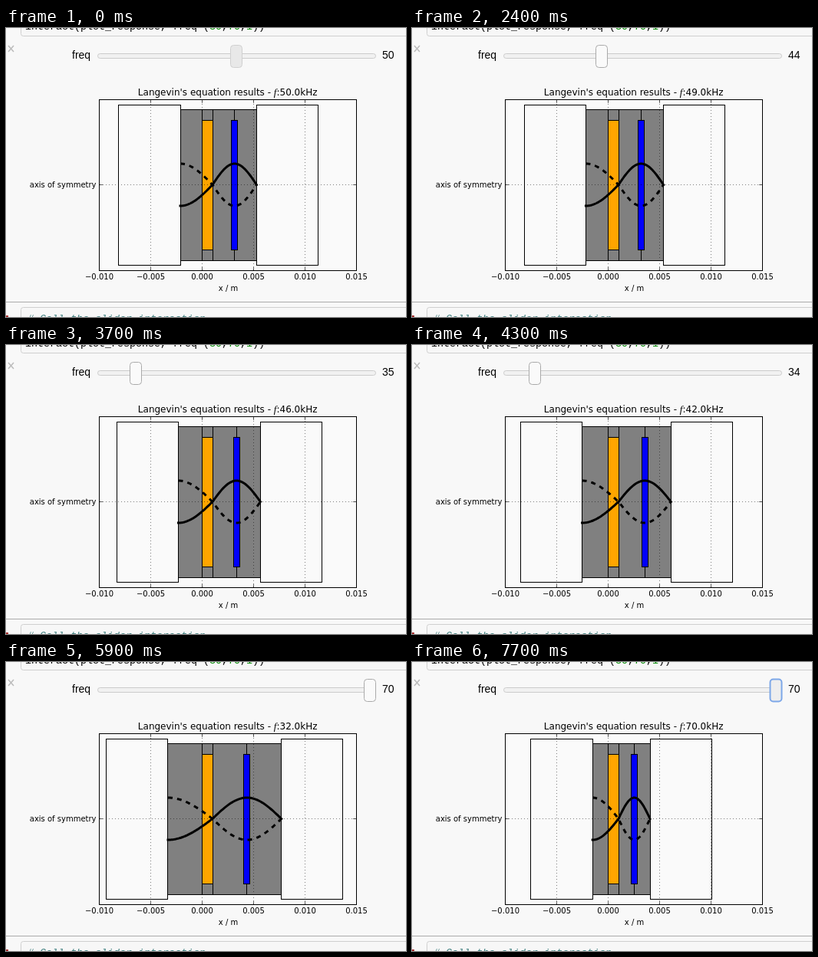
These frames come from a looping animation (521x377 px, 9.2 s). An HTML page:

```html
<!DOCTYPE html>
<html>
<head>
<meta charset="utf-8">
<style>
html, body { margin: 0; height: 100%; overflow: hidden; background: #f8f8f8; }
svg { display: block; }
text { font: 10px "DejaVu Sans", sans-serif; white-space: pre; }
.ui { font: 14px "Liberation Sans", sans-serif; }
.code { font: 13.33px "Liberation Mono", monospace; }
.mid { text-anchor: middle; }
.cell { fill: #f7f7f7; stroke: #cfcfcf; }
.edge { stroke: #000; }
.wave { fill: none; stroke: #000; stroke-width: 3; }
.grid { stroke: #000; stroke-width: .5; stroke-dasharray: 1 3; fill: none; }
</style>
</head>
<body>
<svg width="521" height="377" viewBox="0 0 521 377">
  <rect class="cell" x="19.5" y="-30.5" width="540" height="41" rx="3"/>
  <text class="code" x="25" y="1.5">interact(plot_response, freq<tspan fill="#666">=</tspan>(<tspan fill="#080">30</tspan>,<tspan fill="#080">70</tspan>,<tspan fill="#080">1</tspan>))</text>
  <path d="M3 23l7 8M10 23l-7 8" stroke="#bbb" stroke-width="1.5"/>
  <text class="ui" x="86" y="40">freq</text>
  <rect x="119.5" y="33.5" width="362" height="6" rx="3" fill="#f1f1f1" stroke="#ccc"/>
  <rect id="handle" y="22.5" width="15" height="29" rx="4"/>
  <text class="ui" id="value" x="490" y="40"></text>

  <text class="mid" x="288.7" y="88" style="font-size:12px">Langevin's equation results - <tspan font-family="Liberation Serif, serif" font-style="italic" font-size="13">f</tspan>:<tspan id="freq"></tspan>kHz</text>
  <rect x="121.5" y="93.5" width="335" height="223" fill="#fafafa"/>
  <g id="plot"></g>
  <path class="grid" d="M188.5 316V94M255.5 316V94M322.5 316V94M389.5 316V94M122 204.5H456"/>
  <path id="solid" class="wave" stroke-linecap="square"/>
  <path id="dashed" class="wave" stroke-dasharray="6 6"/>
  <rect class="edge" x="121.5" y="93.5" width="335" height="223" fill="none"/>
  <path id="ticks" class="edge" stroke-width=".6"/>
  <g id="labels" class="mid"></g>
  <text class="mid" x="289.5" y="343">x / m</text>
  <text x="117.5" y="208" text-anchor="end">axis of symmetry</text>

  <path d="M0 357.5H521" stroke="#ababab"/>
  <rect class="cell" x="19.5" y="364.5" width="540" height="60" rx="3"/>
  <rect y="375" width="3" height="2" fill="#a33"/>
  <text class="code" x="28" y="383" fill="#408080" style="font-style:italic"># Call the slider interaction</text>
</svg>
<script>
const LOOP = 9200, MID = 204.5, AMP = 27.5, PIEZO = 255.5, FRONT = 269;
const $ = id => document.getElementById(id);

// Step tables: [start ms, state]
const sliderSteps = [[0, 50], [1700, 49], [1800, 48], [1900, 47], [2200, 46], [2300, 45], [2400, 44],
  [2800, 43], [3000, 42], [3100, 41], [3200, 40], [3300, 38], [3400, 37], [3600, 36], [3700, 35],
  [4300, 34], [4400, 32], [4500, 30], [5700, 40], [5800, 58], [5900, 70]];
const plotSteps = [[0, 50], [2200, 49], [2600, 48], [3000, 47], [3500, 46], [3900, 44], [4300, 42],
  [4800, 38], [5300, 34], [5700, 32], [6300, 30], [6800, 31], [7200, 62], [7700, 70]];
const handleSteps = [[0, ['#e8e8e8', '#d0d0d0']], [400, ['#eee', '#c4c4c4']], [500, ['#f2f2f2', '#b8b8b8']],
  [900, ['#e8e8e8', '#d0d0d0']], [1500, ['#fafafa', '#aaa']], [7200, ['#eee', '#7da7e8']]];
const at = (steps, t) => steps.findLast(s => s[0] <= t)[1];

const snap = x => Math.floor(x) + .5;
const box = (x0, x1, y0, y1, fill) =>
  `<rect class="edge" x="${x0}" y="${y0}" width="${x1 - x0}" height="${y1 - y0}" fill="${fill}"/>`;

function wave(left, right, sign) {
  const points = [], n = 40;
  for (let i = 0; i <= n; i++)
    points.push([left + (FRONT - left) * i / n, MID + sign * AMP * Math.cos(Math.PI / 2 * i / n)]);
  for (let i = 1; i <= n; i++)
    points.push([FRONT + (right - FRONT) * i / n, MID - sign * AMP * Math.sin(Math.PI * i / n)]);
  return 'M' + points.map(p => p.map(v => v.toFixed(2))).join('L');
}

function drawPlot(f) {
  const back = PIEZO - 1425 / f, end = FRONT + 2870 / f;
  const left = snap(back), right = snap(end), centre = snap(FRONT + 1435 / f);
  $('freq').textContent = f.toFixed(1);
  $('plot').innerHTML =
    box(snap(back - 80.3), left, 100.5, 309.5, '#fafafa') +
    box(right, snap(end + 80.3), 100.5, 309.5, '#fafafa') +
    box(left, PIEZO, 106.5, 303.5, 'gray') +
    box(PIEZO, 269.5, 106.5, 303.5, 'gray') +
    box(269.5, centre, 106.5, 303.5, 'gray') +
    box(centre, right, 106.5, 303.5, 'gray') +
    box(PIEZO, 269.5, 120.5, 289.5, 'orange') +
    box(centre - 4, centre + 4, 120.5, 289.5, 'blue');
  $('solid').setAttribute('d', wave(back, end, 1));
  $('dashed').setAttribute('d', wave(back, end, -1));
}

function drawSlider(value, [fill, stroke]) {
  const handle = $('handle');
  handle.setAttribute('x', snap(118 + (value - 30) * 8.7));
  handle.setAttribute('fill', fill);
  handle.setAttribute('stroke', stroke);
  handle.setAttribute('stroke-width', stroke === '#7da7e8' ? 2 : 1);
  $('value').textContent = value;
}

let ticks = 'M122 204.5h4M456 204.5h-4';
for (let i = 0; i < 6; i++) {
  const x = 121.5 + 67 * i, label = ((i - 2) * .005).toFixed(3).replace('-', '\u2212');
  ticks += `M${x} 94v4M${x} 316v-4`;
  $('labels').innerHTML += `<text x="${x}" y="328">${label}</text>`;
}
$('ticks').setAttribute('d', ticks);

let shown;
function frame() {
  const t = performance.now() % LOOP, f = at(plotSteps, t);
  if (f !== shown) drawPlot(shown = f);
  drawSlider(at(sliderSteps, t), at(handleSteps, t));
  requestAnimationFrame(frame);
}
frame();
</script>
</body>
</html>
```
